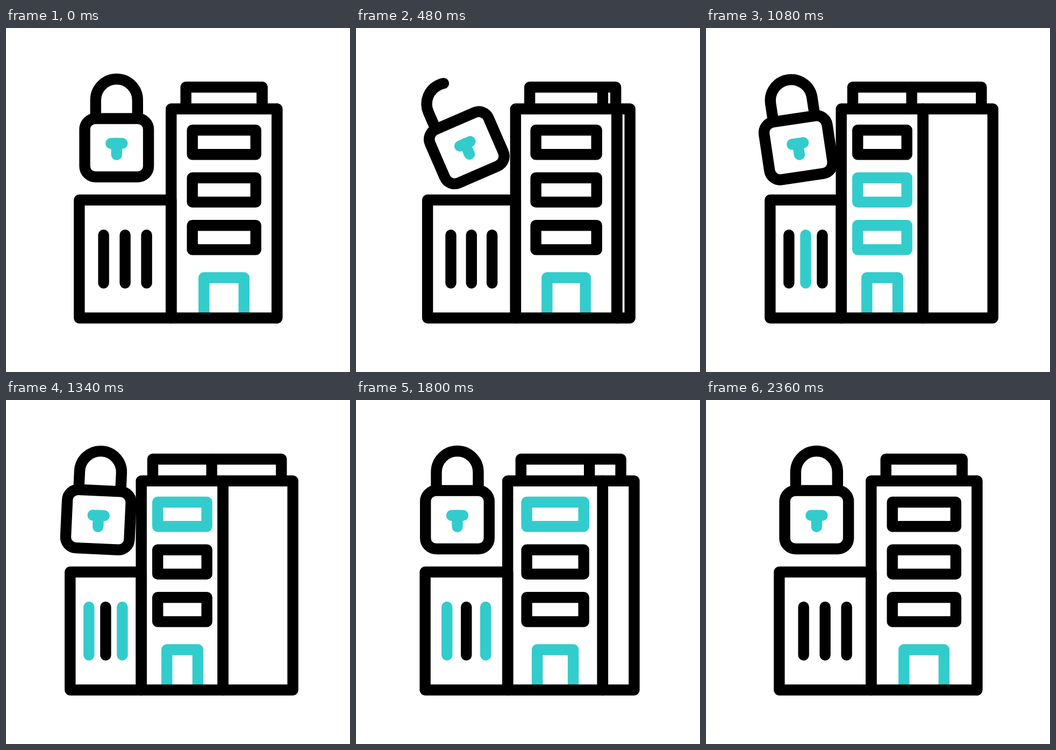
Write an HTML page with a canvas that moves like this. It is 640x640 px and loops after 2.4 s.

```html
<!DOCTYPE html>
<html lang="en">
<head>
<meta charset="utf-8">
<title>Secured building</title>
<style>
  html, body { margin: 0; height: 100%; overflow: hidden; background: #fff; }
  canvas { display: block; width: 640px; height: 640px; }
</style>
</head>
<body>
<canvas id="stage" width="640" height="640"></canvas>
<script>
const ctx = document.getElementById('stage').getContext('2d');
const LOOP = 2400, BLACK = '#000', TEAL = '#33cccc';

// Symmetric cubic ease between two times; pull is the handle length.
function ease(t, from, to, pull = 1 / 3) {
  const x = Math.min(1, Math.max(0, (t - from) / (to - from)));
  let lo = 0, hi = 1;
  for (let i = 0; i < 24; i++) {
    const s = (lo + hi) / 2, r = 1 - s;
    if (3 * r * r * s * pull + 3 * r * s * s * (1 - pull) + s * s * s < x) lo = s;
    else hi = s;
  }
  return lo * lo * (3 - 2 * lo);
}

// Eased value through a list of [time, value] keys.
function track(t, keys) {
  return keys.slice(1).reduce((value, [time, next], i) =>
    value + (next - keys[i][1]) * ease(t, keys[i][0], time), keys[0][1]);
}

const TILT = [[80, 0], [520, -24], [700, 22], [1000, -11], [1300, 3], [1500, 0]];
const SHACKLE = [[100, 190], [420, 103], [580, 103], [740, 190]];

function line(color, ...points) {
  ctx.strokeStyle = color;
  ctx.beginPath();
  points.forEach(([x, y]) => ctx.lineTo(x, y));
  ctx.stroke();
}

function box(color, left, top, right, bottom) {
  ctx.strokeStyle = color;
  ctx.strokeRect(left, top, right - left, bottom - top);
}

function drawBuilding(t) {
  const turn = ease(t, 200, 1020, .58) - ease(t, 1374, 2194, .58);
  const mix = (a, b) => a + (b - a) * turn;
  const lights = t < 620 ? 0 : t < 1210 ? 1 : t < 1960 ? 2 : 0;
  const outer = lights === 2 ? TEAL : BLACK;
  const inner = lights === 1 ? TEAL : BLACK;

  const left = mix(136.3, 119.3), middle = mix(307.3, 251.7);
  const corner = mix(504.2, 403.7), right = mix(504.2, 533.7);
  const roofLeft = mix(334.7, 273), roofCorner = mix(476.5, 382.7), roofRight = mix(476.5, 512.3);
  const doorLeft = mix(368.3, 299.3), doorRight = mix(442.8, 357);

  line(TEAL, [doorLeft, 535], [doorLeft, 464.5], [doorRight, 464.5], [doorRight, 535]);

  [[190, outer], [278.7, inner], [367.2, inner]].forEach(([y, color]) =>
    box(color, mix(346.7, 282.2), y, mix(464.8, 373.7), y + 45.2));

  [[181.6, 154.3, outer], [221.6, 185.4, inner], [261.6, 216.4, outer]].forEach(([a, b, color]) =>
    line(color, [mix(a, b), 385.3], [mix(a, b), 474.5]));

  box(BLACK, left, 320, middle, 539.5);
  box(BLACK, middle, 150.5, corner, 539.5);
  box(BLACK, corner, 150.5, right, 539.5);
  line(BLACK, [roofLeft, 150], [roofLeft, 110], [roofRight, 110], [roofRight, 150]);
  line(BLACK, [roofCorner, 110], [roofCorner, 150]);
}

function drawSparks(t) {
  const head = ease(t, 735, 850), tail = ease(t, 850, 950);
  if (head <= 0 || tail >= .99) return;
  [[77, -90, 20, -16], [79, -59, 26, 0], [79, -31, 18, 16]].forEach(([x, y, dx, dy]) =>
    line(TEAL, [x + dx * tail, y + dy * tail], [x + dx * head, y + dy * head]));
}

function drawLock(t) {
  const slide = 34 * (ease(t, 480, 800) - ease(t, 1394, 2214, .58));
  ctx.save();
  ctx.translate(205.8 - slide, 222.5);
  ctx.rotate(track(t, TILT) * Math.PI / 180);

  ctx.strokeStyle = BLACK;
  ctx.beginPath();
  ctx.roundRect(-59.3, -54, 118.6, 108.5, 20);
  ctx.stroke();

  ctx.setLineDash([track(t, SHACKLE), 400]);
  ctx.beginPath();
  ctx.moveTo(-39, -55);
  ctx.arc(0, -88.5, 39, Math.PI, 0);
  ctx.lineTo(39, -55);
  ctx.stroke();
  ctx.setLineDash([]);

  line(TEAL, [-10.5, -7.7], [10.5, -7.7]);
  line(TEAL, [0, -7.7], [0, 13.3]);
  drawSparks(t);
  ctx.restore();
}

function frame() {
  const t = performance.now() % LOOP;
  ctx.clearRect(0, 0, 640, 640);
  ctx.lineWidth = 20.4;
  ctx.lineCap = ctx.lineJoin = 'round';
  drawBuilding(t);
  drawLock(t);
  requestAnimationFrame(frame);
}
frame();
</script>
</body>
</html>
```
